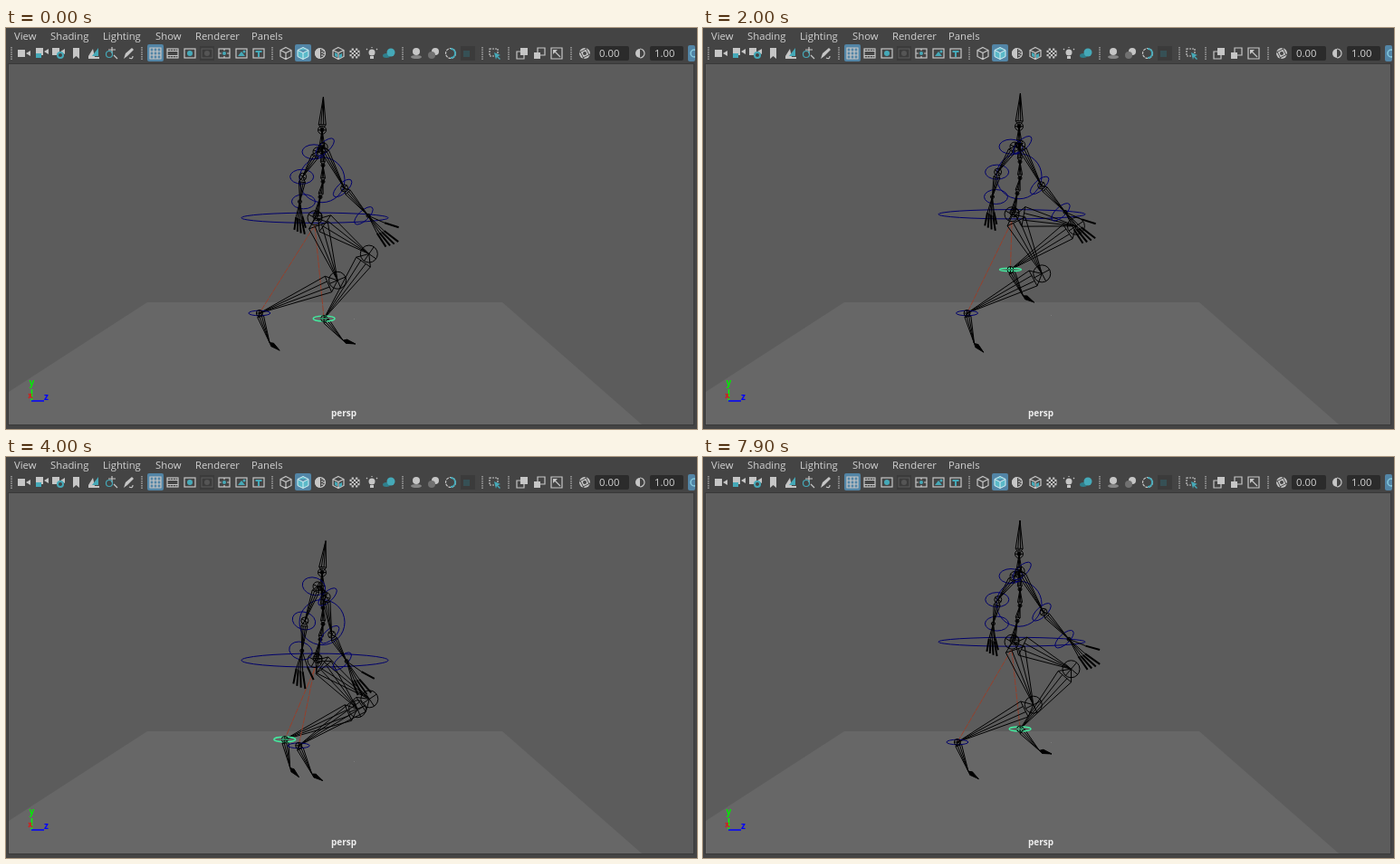
An HTML page with a canvas for the animation above (8000 ms loop, 763 by 443 pixels).

```html
<!DOCTYPE html>
<html lang="en">
<head>
<meta charset="utf-8">
<title>Walk cycle viewport</title>
<style>
html, body { margin: 0; width: 763px; height: 443px; overflow: hidden; background: #444; }
svg, canvas { position: absolute; left: 0; top: 0; display: block; }
text { font: 11.3px "Open Sans", "Noto Sans", sans-serif; fill: #d2d2d2; }
.axis text, .cam { font-weight: 700; font-size: 10px; }
.l { fill: none; stroke: #c6c6c6; stroke-width: 1.2; }
.f { fill: #c6c6c6; }
.t { fill: #45a9b8; }
.d { fill: #2b2b2b; }
.on { fill: #5285a6; }
.sep { stroke: #8a8a8a; stroke-width: 2; stroke-dasharray: 1.5 1; }
</style>
</head>
<body>
<svg width="763" height="443" viewBox="0 0 763 443">
  <rect width="763" height="443" fill="#444"/>
  <rect x="2" y="39" width="758" height="400" fill="#393939"/>
  <rect x="3" y="40" width="756" height="398" fill="#5c5c5c"/>
  <path d="M156 303H548L702 438H3V402Z" fill="#676767"/>

  <text x="9" y="13">View</text>
  <text x="49" y="13">Shading</text>
  <text x="107" y="13">Lighting</text>
  <text x="165" y="13">Show</text>
  <text x="209" y="13">Renderer</text>
  <text x="271" y="13">Panels</text>

  <defs>
    <path id="cam" class="f" d="M-7-4h8v8h-8zM2 0l5-3v6z"/>
    <path id="cube" d="M0-6.5L6-3.5V3.5L0 6.5L-6 3.5V-3.5ZM-6-3.5L0-.5L6-3.5M0-.5V6.5"/>
    <rect id="hl" class="on" x="-9" y="-10" width="18" height="19" rx="2"/>
    <path id="bar" class="sep" d="M0-7V7"/>
    <rect id="frame" x="-6" y="-5" width="12" height="10"/>
  </defs>

  <g>
    <use href="#bar" x="6" y="28"/><use href="#bar" x="150" y="28"/><use href="#bar" x="294" y="28"/>
    <use href="#bar" x="438" y="28"/><use href="#bar" x="526" y="28"/><use href="#bar" x="555" y="28"/><use href="#bar" x="624" y="28"/>
    <use href="#cam" x="20" y="28"/><use href="#cam" x="40" y="26"/><use href="#cam" x="58" y="26"/>
    <rect class="t" x="33" y="28" width="6" height="5"/>
    <circle cx="60" cy="30" r="3" fill="#444" stroke="#45a9b8" stroke-width="2"/>
    <path class="f" d="M74 22h7v12l-3.5-3-3.5 3z"/>
    <path class="f" d="M91 31l5-8 2 9h5v2H91z"/><path class="t" d="M95 31l7-9v9z"/>
    <path class="l" d="M113 24h8M117 21v7M119 30l4 4"/><circle cx="114" cy="29" r="3.5" class="l" style="stroke:#45a9b8"/>
    <path class="f" d="M130 34l2-6 7-6 2 2-7 7z"/><path class="l" d="M136 33q4 2 4-2"/>
  </g>

  <g transform="translate(165 28)"><use href="#hl"/><path class="l" d="M-6-6H6V6H-6ZM-2-6V6M2-6V6M-6-2H6M-6 2H6"/></g>
  <g transform="translate(184 28)"><use href="#frame" class="l"/><path class="l" d="M-6-2.500H6M-6 2.500H6"/><path class="l" stroke-dasharray="1 2" d="M-6-4H6M-6 4H6"/></g>
  <g transform="translate(203 28)"><use href="#frame" class="l"/><circle class="t" r="3"/></g>
  <g transform="translate(222 28)"><rect x="-8" y="-8" width="16" height="16" fill="#3b3b3b"/><use href="#frame" fill="none" stroke="#5c5c5c"/><circle r="3" fill="#555"/></g>
  <g transform="translate(241 28)"><use href="#frame" class="l"/><path class="l" d="M-6 0H6M0-5V5"/><path fill="#444" d="M-3-3h6v6h-6z"/><circle class="t" r="2"/></g>
  <g transform="translate(260 28)"><use href="#frame" class="l"/><path class="t" d="M-4 3L0-2L4 3Z"/><circle class="t" cx="3" cy="-2" r="1.5"/></g>
  <g transform="translate(279 28)"><use href="#frame" class="l"/><path class="t" d="M-3.5-3h7v2H1v5H-1v-5h-2.5z"/></g>

  <use href="#cube" class="l" x="309" y="28"/>
  <g transform="translate(328 28)"><use href="#hl"/><use href="#cube" fill="#5bb9c9" stroke="#d5eef2"/></g>
  <g transform="translate(347 28)"><circle class="l" r="5.5"/><path class="f" d="M0-6A6 6 0 0 0 0 6Z"/><path class="l" stroke-dasharray="2 1" d="M2-5V5M4-4V4"/></g>
  <g transform="translate(367 28)"><use href="#cube" class="l"/><path class="t" d="M-4-1l3 1.500v4l-3-1.500zM1 1.500l3-1.500v4l-3 1.500z"/></g>
  <g transform="translate(385 28)" fill="none" stroke="#c6c6c6" stroke-width="2.200" stroke-dasharray="2.200"><path d="M-3.300-4.400H4M-5.500-2.200H6M-5.500 2.200H6M-3.300 4.400H4"/><path stroke-dashoffset="2.200" d="M-5.500 0H6"/></g>
  <g transform="translate(404 28)"><circle class="f" cy="-1" r="3.5"/><path class="f" d="M-2 3h4v3h-4z"/><path class="l" d="M-6-5l1 1M6-5l-1 1M0-7v1"/></g>
  <g transform="translate(423 28)"><ellipse cx="-3" cy="2.500" rx="4" ry="2.500" fill="#2f7f8c"/><circle class="t" cx="2" cy="-1" r="4.500"/></g>
  <g transform="translate(453 28)"><circle class="f" cy="-2" r="4"/><ellipse cy="4" rx="6" ry="2" fill="#858585"/></g>
  <g transform="translate(472 28)"><circle class="f" cx="2" cy="-2" r="4"/><circle cx="-2" cy="2" r="4" fill="#707070"/></g>
  <g transform="translate(491 28)"><circle class="l" r="5.5" stroke-dasharray="3 1"/><path d="M0-5A5 5 0 0 1 0 5" fill="none" stroke="#45a9b8" stroke-width="2"/></g>
  <g transform="translate(510 28)"><rect x="-8" y="-8" width="16" height="16" fill="#3b3b3b"/><path fill="#365055" d="M-5-3h7v7h-7z"/></g>
  <g transform="translate(540 28)"><path class="l" stroke-dasharray="2 1" d="M-6-5H3V3H-6Z"/><path class="t" d="M-1-1l7 3-3 1 3 3-1 1-3-3-1 3z"/></g>
  <g transform="translate(570 28)"><path class="f" d="M-2-6H6V2H-2z"/><path class="l" d="M-6-2H2V6H-6Z"/></g>
  <g transform="translate(589 28)"><path class="l" d="M-2-6H6V2H-2Z"/><path class="f" d="M-6-1H1V6H-6z"/></g>
  <g transform="translate(608 28)"><path class="l" d="M-6-6H6V6H-6ZM-3-3L4 4"/><path class="f" d="M-4-4h5l-5 5z"/></g>
  <g transform="translate(639 28)"><circle class="f" r="6"/><path stroke="#444" d="M-6-1L2-5M1-6L5 2M6 1L-2 5M-1 6L-5-2"/><circle r="2" fill="#444"/></g>
  <rect class="d" x="650" y="20" width="38" height="16" rx="2"/><text x="655" y="32">0.00</text>
  <g transform="translate(700 28)"><path class="f" d="M0-5A5 5 0 0 0 0 5Z"/><path class="l" d="M0-5A5 5 0 0 1 0 5"/></g>
  <rect class="d" x="711" y="20" width="37" height="16" rx="2"/><text x="716" y="32">1.00</text>
  <rect class="on" x="753" y="19" width="8" height="18" rx="2"/><circle cx="760" cy="28" r="4" fill="none" stroke="#86c9dc" stroke-width="1.5"/>
  <rect x="761" y="17" width="2" height="22" fill="#444"/>

  <g class="axis" stroke-width="1.5">
    <path d="M28.500 399V412" stroke="#0f0"/><path d="M28 412H42" stroke="#00f"/><path d="M25 404l4 5M28 404l-3 5" stroke="#c22"/>
    <text x="25.500" y="395" style="fill:#0e0">y</text><text x="42" y="411" style="fill:#00f">z</text>
  </g>
  <text class="cam" x="373" y="429" text-anchor="middle" style="fill:#eee">persp</text>
</svg>
<canvas id="rig" width="763" height="443"></canvas>

<script>
const g = document.getElementById('rig').getContext('2d');
const BLUE = '#00006c', GREEN = '#43eda0', RED = '#96402c';
const { PI, cos, sin, max } = Math;

// The walk has ten poses per cycle; k is a position in that cycle.
const wave = (k, harmonic = 1) => cos(2 * PI * harmonic * k / 10);
const strike = k => max(0, wave(k)) ** 4;
const dip = k => (0.5 + 0.5 * wave(k - 1.5, 2)) ** 2;
const swing = k => wave(k - 4.4);
const hipY = k => 202.5 + 27 * dip(k) + 4 * strike(k);

const angle = (a, b) => Math.atan2(b[1] - a[1], b[0] - a[0]);
const polar = ([x, y], r, t) => [x + r * cos(t), y + r * sin(t)];

function ankleAt(k) {
  const u = ((k % 10 + 10) % 10 - 6.05) / 3.3;
  const lift = u > 0 && u < 1 ? 47 * sin(PI * u) : 0;
  return [325 + 27 * wave(k + 0.4), 312 + 9 * strike(k) - lift];
}

const footPitch = k =>
  (68 - 11 * wave(k) + 3 * wave(k - 2.5) - 8 * wave(k, 2) + 7 * wave(k - 1.25, 2)) * PI / 180;

// Two-bone IK with the knee pointing forward.
function kneeAt(hip, ankle, thigh, shin) {
  const d = Math.min(thigh + shin - 0.1, Math.hypot(ankle[0] - hip[0], ankle[1] - hip[1]));
  const bend = Math.acos((thigh ** 2 + d ** 2 - shin ** 2) / (2 * thigh * d));
  return polar(hip, thigh, angle(hip, ankle) - bend);
}

function poly(points, color = '#000', width = 1) {
  g.strokeStyle = color;
  g.lineWidth = width;
  g.beginPath();
  points.forEach(p => g.lineTo(...p));
  g.stroke();
}

function ring([x, y], rx, ry, tilt = 0, color = BLUE, width = 1) {
  g.strokeStyle = color;
  g.lineWidth = width;
  g.beginPath();
  g.ellipse(x, y, rx, ry, tilt, 0, 7);
  g.stroke();
}

function ball(p, r, tilt = 0) {
  ring(p, r, r, 0, '#000');
  for (const t of [tilt, tilt + PI / 2]) poly([polar(p, -r, t), polar(p, r, t)]);
}

// Pyramid: wide close to the parent joint a, pointed at the child b.
function bone(a, b, w, gap = w, solid = false) {
  const t = angle(a, b), c = polar(a, gap, t);
  const side = s => polar(c, w * s, t + PI / 2);
  poly([a, side(1), b, side(-1), a]);
  if (solid) { g.fillStyle = '#000'; g.fill(); }
  poly([side(1), side(-1)]);
  for (const s of [-0.35, 0.35]) poly([side(s), b]);
}

function hand(p, deg, size, thumb) {
  const finger = (off, len) => {
    const t = (deg + off) * PI / 180, mid = polar(p, len * 0.55, t + 0.05);
    poly([p, mid]);
    poly([mid, polar(p, len, t)], '#000', 2);
  };
  for (let i = 0; i < 4; i++) finger(-9 + 6.5 * i, size - 1.5 * i);
  finger(-thumb, size * 0.82);
}

function drawArm(a) {
  a.joints.forEach((p, i) => ring([p[0] + a.shift[i], p[1]], 13, a.open, a.tilt));
  const [shoulder, elbow, wrist] = a.joints;
  bone(shoulder, elbow, 4, 6);
  bone(elbow, wrist, 3.5, 6);
  ball(shoulder, 5, 0.4);
  ball(elbow, 4, 0.6);
  ball(wrist, 2);
  hand(wrist, a.turn, a.size, a.thumb);
}

function backArm(k, h) {
  const s = swing(k), d = dip(k), back = max(0, s);
  return {
    joints: [
      [344, h - 78.5 - 6 * s],
      [319 - 7 * s + 18 * d, h - 50.5 - 4 * s + 11 * d],
      [304 - 17 * s + 39 * d, h - 24.5 - 4.5 * s + 20 * d]
    ],
    shift: [-4, -1, 4 - 10 * back],
    open: 8 + 3 * back, tilt: 0.6 * back,
    turn: 104 + 12 * s - 20 * d, size: 40 + 4 * s, thumb: 13 + 24 * back
  };
}

function frontArm(k, h) {
  const s = swing(k), d = dip(k);
  return {
    joints: [
      [352 + 2 * s, h - 73 + 5.5 * s],
      [376 - 20 * d, h - 30 + 3 * s],
      [404 - 34 * d, h - 3 + 5 * d]
    ],
    shift: [2, -2, -5],
    open: 5.5, tilt: -0.75,
    turn: 48 + 16 * d, size: 44, thumb: 29
  };
}

function leg(k, hip, ankle, scale, selected) {
  const knee = kneeAt(hip, ankle, 68 * scale, 87 * scale);
  const pitch = footPitch(k), toe = polar(ankle, 32 * scale, pitch);
  g.setLineDash([7, 1]);
  poly([[341, hip[1] + 8], ankle], RED);
  g.setLineDash([]);
  bone(hip, knee, 11, 9);
  bone(knee, ankle, 9.5, 11);
  ball(knee, 9.5, angle(knee, ankle));
  bone(ankle, toe, 3.5, 4);
  bone(toe, polar(toe, 14, pitch - 0.58), 2.2, 4, true);
  ring(ankle, 12, 1.7 + max(0, ankle[1] - 270) / 42, 0, selected ? GREEN : BLUE, selected ? 1.4 : 1);
  ball(ankle, 3.5);
  if (selected) poly([polar(ankle, -4, 0), polar(ankle, 4, 0)], GREEN);
}

function draw(k) {
  const h = hipY(k), lean = 2.3 * wave(k - 4) + 2.3;
  const neck = [349, h - 78], head = [349, h - 97];
  g.clearRect(0, 0, 763, 443);
  ring([341, h], 81, 4.8 + max(0, h - 203) * 0.125);
  ring([349, h - 42], 25, 25);

  const far = ankleAt(k), [x, y] = ankleAt(k + 5);
  leg(k, [345, h + 1], far, 1, true);
  leg(k + 5, [342, h], [x - 19, y + 3], 1.075, false);

  const spine = [[342, h], [347, h - 23], [350, h - 40], [350, h - 58], neck, head];
  spine.slice(1).forEach((p, i) => { bone(spine[i], p, 2.5, 4); ball(p, 2); });
  ball([341, h], 8, 0.5);
  ball([344, h - 2], 5);
  bone(head, [350 + lean, h - 134 + lean * 0.7], 4, 6);
  ball(head, 4.5);

  for (const a of [backArm(k, h), frontArm(k, h)]) {
    bone(neck, a.joints[0], 3, 3);
    drawArm(a);
  }

  g.fillStyle = '#7c7c7c';
  g.fillRect(384, Math.round(h + 111), 1, 1);
}

// Playback, a pause, then scrubbing by hand with short stops.
function keyAt(tick) {
  if (tick < 47) {
    const p = tick % 11;
    return p < 5 ? p : p - 1;
  }
  if (tick < 56) return 2;
  if (tick < 60) return (tick - 56) / 2;
  if (tick <= 70) return 5 + max(0, tick - 66) / 8;
  const moved = tick % 3 === 2 ? tick - 1 : tick;
  return 5.5 + (moved - 70) * 3.5 / 9;
}

const start = performance.now();
function loop() {
  draw(keyAt(Math.floor((performance.now() - start) % 8000 / 100)));
  requestAnimationFrame(loop);
}
loop();
</script>
</body>
</html>
```
